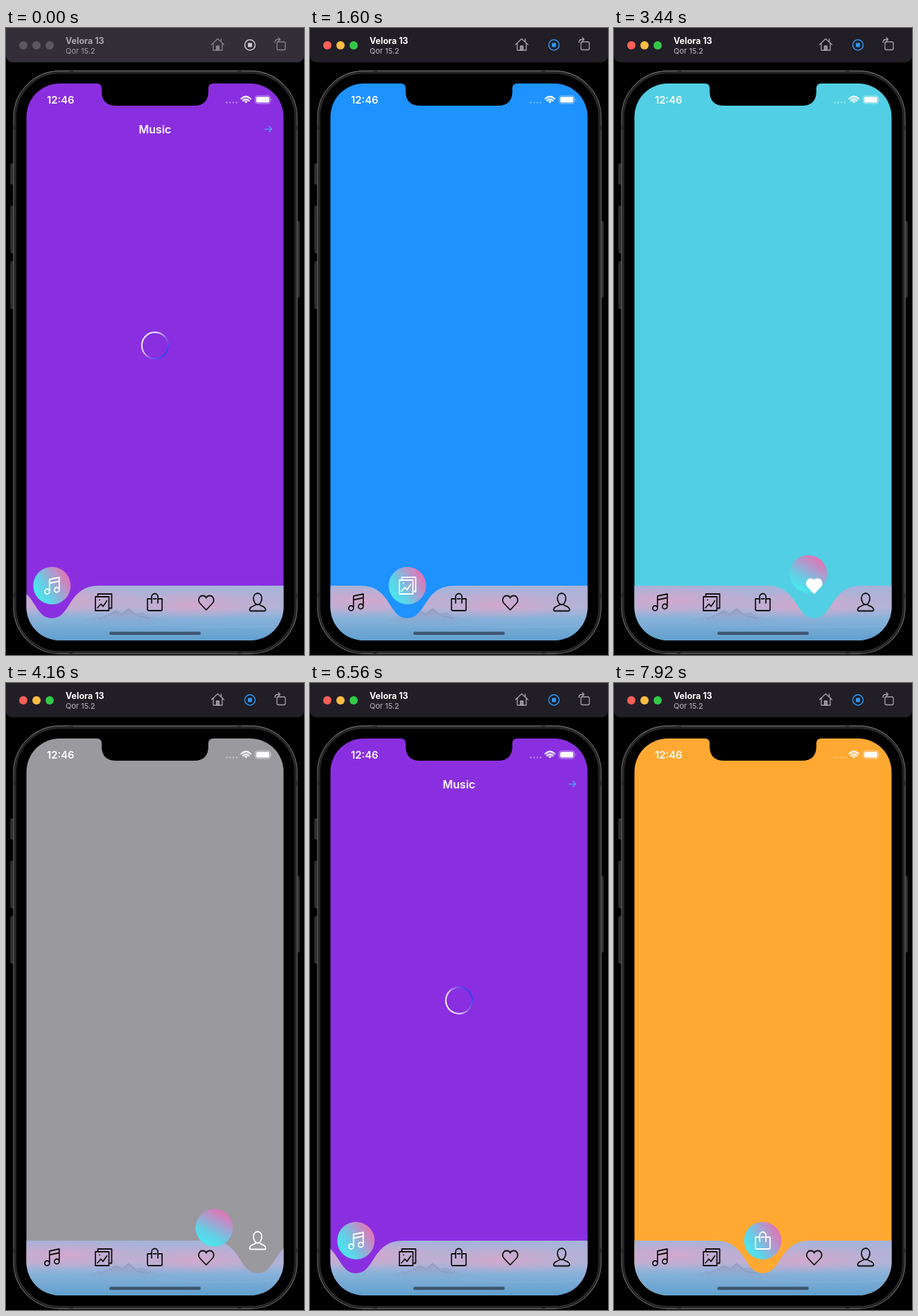
Write an HTML page that moves like this. It is 430 by 904 pixels and loops after 8 s.

```html
<!DOCTYPE html>
<html lang="en">
<head>
<meta charset="utf-8">
<title>Tab bar</title>
<style>
html, body { margin: 0; width: 100%; height: 100%; overflow: hidden; background: #000; }
svg { display: block; width: 430px; height: 904px; font-family: Inter, "Liberation Sans", sans-serif; }
.line { fill: none; stroke-linecap: round; stroke-linejoin: round; }
</style>
</head>
<body>
<svg viewBox="0 0 430 904">
  <defs>
    <clipPath id="screen"><rect x="29.5" y="80" width="371" height="803" rx="48"/></clipPath>
    <clipPath id="wave"><path id="wavePath"/></clipPath>
    <linearGradient id="sky" x2="0" y2="1">
      <stop stop-color="#a5b3da"/>
      <stop offset=".2" stop-color="#b3b1d6"/>
      <stop offset=".4" stop-color="#b4b3d7"/>
      <stop offset=".6" stop-color="#87b1d9"/>
      <stop offset="1" stop-color="#609fcd"/>
    </linearGradient>
    <radialGradient id="blush">
      <stop stop-color="#dba5c9" stop-opacity=".75"/>
      <stop offset="1" stop-color="#dba5c9" stop-opacity="0"/>
    </radialGradient>
    <linearGradient id="hill" x2="0" y2="1">
      <stop stop-color="#a59fbf"/>
      <stop offset="1" stop-color="#7fa8d0" stop-opacity=".2"/>
    </linearGradient>
    <linearGradient id="ballFill" x1="0" y1="1" x2="0" y2="0">
      <stop offset=".05" stop-color="#4fe3ee"/>
      <stop offset=".3" stop-color="#62cfe6"/>
      <stop offset=".65" stop-color="#a99fd0"/>
      <stop offset="1" stop-color="#e274b4"/>
    </linearGradient>
    <linearGradient id="ringFill" x1="0" y1="1" x2="0" y2="0">
      <stop stop-color="#fff"/>
      <stop offset=".3" stop-color="#e6d6f9"/>
      <stop offset=".65" stop-color="#8a60e8"/>
      <stop offset="1" stop-color="#3540ee"/>
    </linearGradient>
  </defs>

  <!-- window bar -->
  <rect id="bar" y="-10" width="430" height="59.500" rx="9"/>
  <g id="lights"><circle cx="25" cy="25" r="6"/><circle cx="44" cy="25" r="6"/><circle cx="63" cy="25" r="6"/></g>
  <text id="device" x="86" y="23" font-size="12.500" font-weight="700">Velora 13</text>
  <text id="system" x="86" y="37" font-size="11">Qor 15.2</text>
  <g id="tools" class="line" stroke-width="1.300">
    <path d="M296.500 24L305.500 15.500L314.500 24M299 22V32H312V22M310.500 19V16"/>
    <path d="M303.500 32V26H307.500V32Z" fill="#8b8690"/>
    <path d="M393 20H401Q403 20 403 22V29.500Q403 31.500 401 31.500H393Q391 31.500 391 29.500V22Q391 20 393 20M388 21Q388 16.500 392.500 16.500H395M393 14L395.500 16.500L393 19"/>
  </g>
  <g id="stop"><circle cx="352" cy="24.500" r="7.500" fill="none" stroke-width="1.500"/><rect x="349" y="21.500" width="6" height="6" rx="1" stroke="none"/></g>

  <!-- phone -->
  <g fill="#29292a" stroke="#555" stroke-width=".8">
    <rect x="7" y="196" width="5" height="29" rx="1"/>
    <rect x="7" y="257" width="5" height="67" rx="1"/>
    <rect x="7" y="337" width="5" height="67" rx="1"/>
    <rect x="419" y="279" width="4" height="109" rx="1"/>
  </g>
  <rect x="11" y="62" width="409" height="840" rx="67" fill="#000" stroke="#6b6b6c" stroke-width="1.300"/>
  <rect x="13.500" y="64.500" width="404" height="835" rx="64.500" fill="none" stroke="#2b2b2c" stroke-width="2.500"/>
  <path d="M94 62V66M337 62V66M94 898V902M337 898V902M11 144H15M416 144H420M11 818H15M416 818H420" stroke="#222" stroke-width="6"/>

  <g clip-path="url(#screen)">
    <rect id="page" x="29" y="80" width="372" height="804"/>
    <g id="header">
      <text x="215" y="151.500" text-anchor="middle" font-size="16" font-weight="600" fill="#fff">Music</text>
      <path d="M373.500 145.800H383.500M379.500 141.800L383.500 145.800L379.500 149.800" class="line" stroke="#4aa5fb" stroke-width="1.300"/>
      <circle id="ring" r="19" fill="none" stroke="url(#ringFill)" stroke-width="2"/>
    </g>
    <g clip-path="url(#wave)">
      <rect x="29" y="804" width="372" height="80" fill="url(#sky)"/>
      <ellipse cx="80" cy="825" rx="130" ry="22" fill="url(#blush)"/>
      <ellipse cx="275" cy="832" rx="115" ry="20" fill="url(#blush)"/>
      <path d="M112 855L133 848L145 849L158 839L168 843L177 836L187 844L198 843L215 850L238 855L200 861L140 860Z" fill="url(#hill)"/>
      <path d="M135 852L158 841L167 846L177 838L190 848L207 851" class="line" stroke="#7e91b9" stroke-opacity=".7"/>
      <path d="M30 858Q80 851 125 858M215 859Q290 868 400 861" class="line" stroke="#81b3d8" stroke-width="3" stroke-opacity=".6"/>
    </g>
    <circle id="ball" r="27" fill="url(#ballFill)"/>
    <g id="icons" class="line" stroke-width="1.800"></g>
    <rect x="149" y="870.500" width="132" height="4.500" rx="2.250" fill="#3e566f"/>
  </g>

  <path d="M131 79V80Q138 80 138 87V91Q138 112 159 112H271Q292 112 292 91V87Q292 80 299 80V79Z"/>
  <text x="59" y="109" font-size="14.800" font-weight="600" fill="#fff">12:46</text>
  <path d="M318.500 107.500H333" class="line" stroke="#fff" stroke-opacity=".4" stroke-width="2.400" stroke-dasharray=".1 4.600"/>
  <g class="line" stroke="#fff" stroke-width="2.300" stroke-linecap="butt">
    <path d="M339.500 102Q346.300 95.500 353 102M342 104.800Q346.300 100.800 350.500 104.800"/>
    <path d="M346.300 108.500L344 106Q346.300 104.200 348.600 106Z" fill="#fff" stroke="none"/>
  </g>
  <rect x="359.500" y="97.800" width="22" height="11.200" rx="3.300" fill="none" stroke="#fff" stroke-opacity=".5"/>
  <rect x="361" y="99.300" width="19" height="8.200" rx="2" fill="#fff"/>
  <path d="M383 101.500Q384.800 103.400 383 105.300Z" fill="#fff" fill-opacity=".6"/>
</svg>

<script>
const LOOP = 8000, MOVE = 500, FOCUS = 1000, SPIN = 940;
const PAGES = ['#8a2fe0', '#1e92ff', '#ffa932', '#52cfe4', '#9a999e'];
// [time, tab]
const TAPS = [[0, 0], [FOCUS, 1], [2240, 2], [3145, 3], [3950, 4], [5315, 0], [6800, 2]];
const SHAPES = [
  'M-3.500 8.500V-9L10.500 -12V6M-3.500 -3.500L10.500 -6.500M-3.500 8.500A3.500 3.500 0 1 1 -10.500 8.500A3.500 3.500 0 1 1 -3.500 8.500M10.500 6A3.500 3.500 0 1 1 3.500 6A3.500 3.500 0 1 1 10.500 6',
  'M-11.500 -8H8V12H-11.500ZM-8 -8V-12H12V8.500H8M-8.500 8L-3.500 2.500L-0.500 6L5 -2M-5.500 -3.500V-3.400',
  'M-4.500 -5H-10.500V10Q-10.500 12 -8.500 12H8.500Q10.500 12 10.500 10V-5H4.500M-2 -5H2M-4.500 0V-8A4.500 4.500 0 0 1 4.500 -8V0M-4.500 0V1M4.500 0V1',
  'M0 11L-9 1.500C-13 -3 -10 -9.500 -5 -9.500C-2 -9.500 -0.500 -7.500 0 -6C0.500 -7.500 2 -9.500 5 -9.500C10 -9.500 13 -3 9 1.500Z',
  'M0 -13C4 -13 6 -9.500 6 -5.500C6 -1 3 3.500 0 3.500C-3 3.500 -6 -1 -6 -5.500C-6 -9.500 -4 -13 0 -13M-3 3C-3 6 -11.500 5 -11.500 11Q-11.500 12.500 -10 12.500H10Q11.500 12.500 11.500 11C11.500 5 3 6 3 3'
];

const $ = id => document.getElementById(id);
const set = (el, attrs) => { for (const k in attrs) el.setAttribute(k, attrs[k]); };
const tabX = i => 66.3 + 74.2 * i;

const icons = SHAPES.map(d => {
  const path = document.createElementNS('http://www.w3.org/2000/svg', 'path');
  path.setAttribute('d', d);
  return $('icons').appendChild(path);
});

// Pulls back before the move and overshoots after it
function easeBack(t) {
  const c = 2.595, u = 2 * t;
  return t < .5
    ? u * u * ((c + 1) * u - c) / 2
    : ((u - 2) ** 2 * ((c + 1) * (u - 2) + c) + 2) / 2;
}

function drawWindow(focused) {
  set($('bar'), { fill: focused ? '#221e26' : '#342e39' });
  ['#fe6058', '#fdbd40', '#34c84a'].forEach((c, i) =>
    set($('lights').children[i], { fill: focused ? c : '#5d5761' }));
  set($('device'), { fill: focused ? '#fff' : '#aaa5ad' });
  set($('system'), { fill: focused ? '#bbb7be' : '#a09ba4' });
  set($('tools'), { stroke: focused ? '#a5a1a8' : '#87828b' });
  const stop = focused ? '#2b96f3' : '#cfcbd2';
  set($('stop'), { fill: stop, stroke: stop });
}

function drawTab(tab) {
  const x = tabX(tab);
  set($('page'), { fill: PAGES[tab] });
  set($('header'), { visibility: tab ? 'hidden' : 'visible' });
  set($('wavePath'), {
    d: `M-90 804H${x - 68}C${x - 23} 804 ${x - 28} 851 ${x} 851S${x + 23} 804 ${x + 68} 804H520V884H-90Z`
  });
  icons.forEach((icon, i) => {
    const on = i === tab;
    set(icon, {
      transform: `translate(${tabX(i)} ${on ? 804 : 828})`,
      stroke: on ? '#fff' : '#111',
      fill: on && i === 3 ? '#fff' : 'none'
    });
  });
}

function frame(now) {
  const time = now % LOOP;
  const n = TAPS.filter(tap => tap[0] <= time).length - 1;
  const [start, tab] = TAPS[n];
  const p = n ? Math.min(1, (time - start) / MOVE) : 1;
  const from = tabX(TAPS[Math.max(0, n - 1)][1]);
  const x = from + (tabX(tab) - from) * easeBack(p);
  const lift = Math.max(0, p * (83 - 92 * p));

  drawWindow(time >= FOCUS);
  drawTab(tab);
  set($('ball'), { transform: `translate(${x} ${804 - lift}) rotate(${60 - lift * 1.7})` });
  const turn = (n ? -58 : 130) + (time - start) / SPIN * 360;
  set($('ring'), { transform: `translate(215 457.700) rotate(${turn})` });
  requestAnimationFrame(frame);
}
requestAnimationFrame(frame);
</script>
</body>
</html>
```
